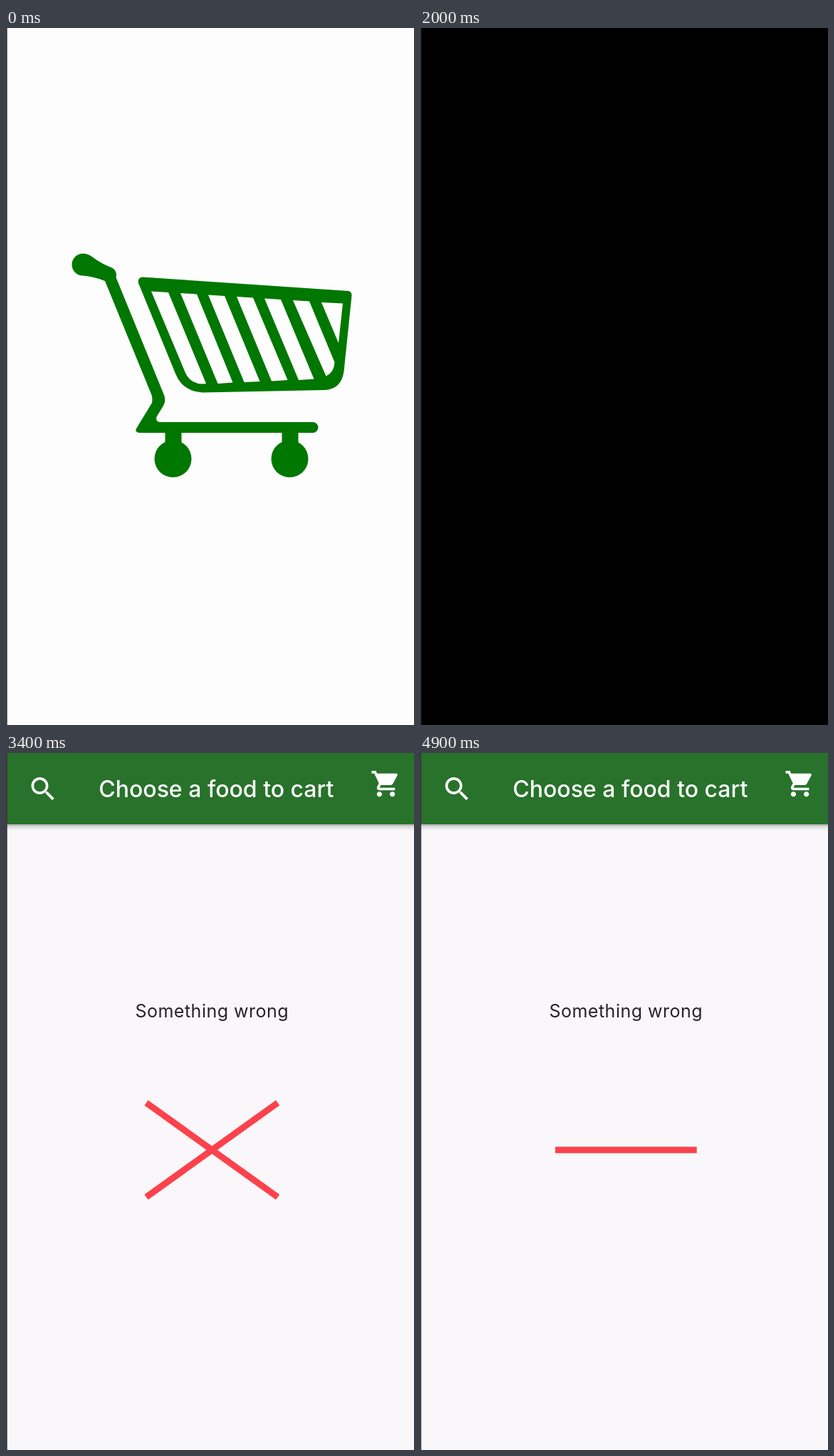
Recreate the animation shown at these times as an HTML page. Size 573 by 978 pixels, loop 5 s.

```html
<!DOCTYPE html>
<html lang="en">
<head>
<meta charset="utf-8">
<title>Food cart</title>
<style>
  html, body { margin: 0; width: 100%; height: 100%; overflow: hidden; background: #000; }
  svg { display: block; width: 100%; height: 100%; }
  text { font-family: Inter, Roboto, sans-serif; text-anchor: middle; }
</style>
</head>
<body>
<svg viewBox="0 0 573 978">
  <defs>
    <linearGradient id="shade" x2="0" y2="1">
      <stop offset="0" stop-color="#000" stop-opacity=".3"/>
      <stop offset=".4" stop-color="#000" stop-opacity=".11"/>
      <stop offset="1" stop-color="#000" stop-opacity="0"/>
    </linearGradient>
  </defs>

  <g id="splash">
    <rect width="573" height="978" fill="#fefdfe"/>
    <g fill="#070">
      <path d="M108 316.500C113 316.500 117 318 121 321Q134 331 149 336.500Q155 340 155 347L154.500 350L222 515Q225 523 221 530L211.500 545.500Q210 552 216 553H431A7.500 7.500 0 0 1 431 568H187Q180.500 567 183 562L205 526Q206 521 204.500 515L139 355Q125 349 108 347.500A15.500 15.500 0 0 1 108 316.500Z"/>
      <path d="M223.500 566H246.500V590H223.500ZM387.500 566H410.500V590H387.500Z"/>
      <circle cx="234.500" cy="604.500" r="26"/>
      <circle cx="398.500" cy="604.500" r="26"/>
      <path fill-rule="evenodd" d="M192 349.500L481 369Q486 370 485.500 376L474.500 482Q471 507 447 508L276 511.500Q248 510 238 485L186 358Q184.500 350 192 349.500Z
        M204 369.500L228 371L281 499L276 499.500Q259 499 252 484Z
        M245 372L268 373.500L318.500 497.500L297.500 499Z
        M284 374.500L307 376L356.500 496L334.500 497Z
        M324 377L347 378.500L395.500 494L373 495.500Z
        M363 379.500L386 381L432.500 492.500L411 494Z
        M403 382L426 383.500L461.500 469Q461 483 449.500 488.500Z
        M443 385L473 386.500L467 442Z"/>
    </g>
    <rect id="dim" width="573" height="978"/>
  </g>

  <g id="app">
    <rect width="573" height="978" fill="#f9f7fa"/>
    <rect y="100" width="573" height="9" fill="url(#shade)"/>
    <rect width="573" height="100" fill="#28722b"/>
    <g fill="#fff">
      <path transform="translate(30 28.500) scale(1.840)" d="M15.500 14h-.79l-.28-.27C15.410 12.590 16 11.110 16 9.500 16 5.910 13.090 3 9.500 3S3 5.910 3 9.500 5.910 16 9.500 16c1.610 0 3.090-.59 4.230-1.570l.27.28v.79l5 4.990L20.490 19l-4.990-5zm-6 0C7.010 14 5 11.990 5 9.500S7.010 5 9.500 5 14 7.010 14 9.500 11.990 14 9.500 14z"/>
      <path transform="translate(511.700 21.400) scale(1.820)" d="M7 18c-1.100 0-1.990.9-1.990 2S5.900 22 7 22s2-.9 2-2-.9-2-2-2zM1 2v2h2l3.600 7.590-1.350 2.450c-.16.28-.25.61-.25.96 0 1.100.9 2 2 2h12v-2H7.420c-.14 0-.25-.11-.25-.25l.03-.12.9-1.630h7.450c.75 0 1.410-.41 1.750-1.030l3.580-6.490c.08-.14.12-.31.12-.48 0-.55-.45-1-1-1H5.210l-.94-2H1zm16 16c-1.100 0-1.990.9-1.990 2s.89 2 1.990 2 2-.9 2-2-.9-2-2-2z"/>
      <text x="295.300" y="62" font-size="32" font-weight="500">Choose a food to cart</text>
    </g>
    <rect id="loader" x="285.500" y="506" width="7.500" height="7.500" fill="#43964a"/>
    <g id="error">
      <text x="289.300" y="370.500" font-size="25" letter-spacing=".5" fill="#242328">Something wrong</text>
      <path id="cross" stroke="#fc424c" stroke-width="9" fill="none"/>
    </g>
  </g>

  <rect id="edge" width="1.700" height="978" fill="#37353a"/>
</svg>
<script>
const LOOP = 5000, STEP = 100;
const DIM_AT = 1900, BLACK_AT = 2000, APP_AT = 2500, ERROR_AT = 2550;
const CYCLE = 2000, GROW = 400, TURN_AT = 360, TURN = 1000;
const CX = 289.3, CY = 557, HALF = 113.6;

const el = id => document.getElementById(id);
const clamp = v => Math.min(1, Math.max(0, v));
const show = (id, on) => el(id).setAttribute('visibility', on ? 'inherit' : 'hidden');
const bezier = (a, b, s) => 3 * a * s * (1 - s) ** 2 + 3 * b * s * s * (1 - s) + s ** 3;

// cubic-bezier(.25, .1, .25, 1), solved by bisection
function ease(x) {
  let lo = 0, hi = 1;
  for (let i = 0; i < 24; i++) {
    const mid = (lo + hi) / 2;
    if (bezier(.25, .25, mid) < x) lo = mid; else hi = mid;
  }
  return bezier(.1, 1, lo);
}

// A line grows from the centre, then opens like scissors into a cross.
function crossPath(t) {
  const half = HALF * clamp(t / GROW);
  const angle = Math.PI / 4 * ease(clamp((t - TURN_AT) / TURN));
  const dx = half * Math.cos(angle), dy = half * Math.sin(angle);
  const line = s => `M${CX - dx} ${CY - s * dy}L${CX + dx} ${CY + s * dy}`;
  return line(1) + line(-1);
}

function draw(ms) {
  const t = Math.floor(ms % LOOP / STEP) * STEP;
  show('splash', t < BLACK_AT);
  el('dim').setAttribute('opacity', t < DIM_AT ? 0 : .031);
  show('app', t >= APP_AT);
  show('loader', t < ERROR_AT);
  show('error', t >= ERROR_AT);
  if (t >= ERROR_AT) el('cross').setAttribute('d', crossPath((t - ERROR_AT) % CYCLE));
}

const start = performance.now();
function tick() {
  draw(performance.now() - start);
  requestAnimationFrame(tick);
}
tick();
</script>
</body>
</html>
```
